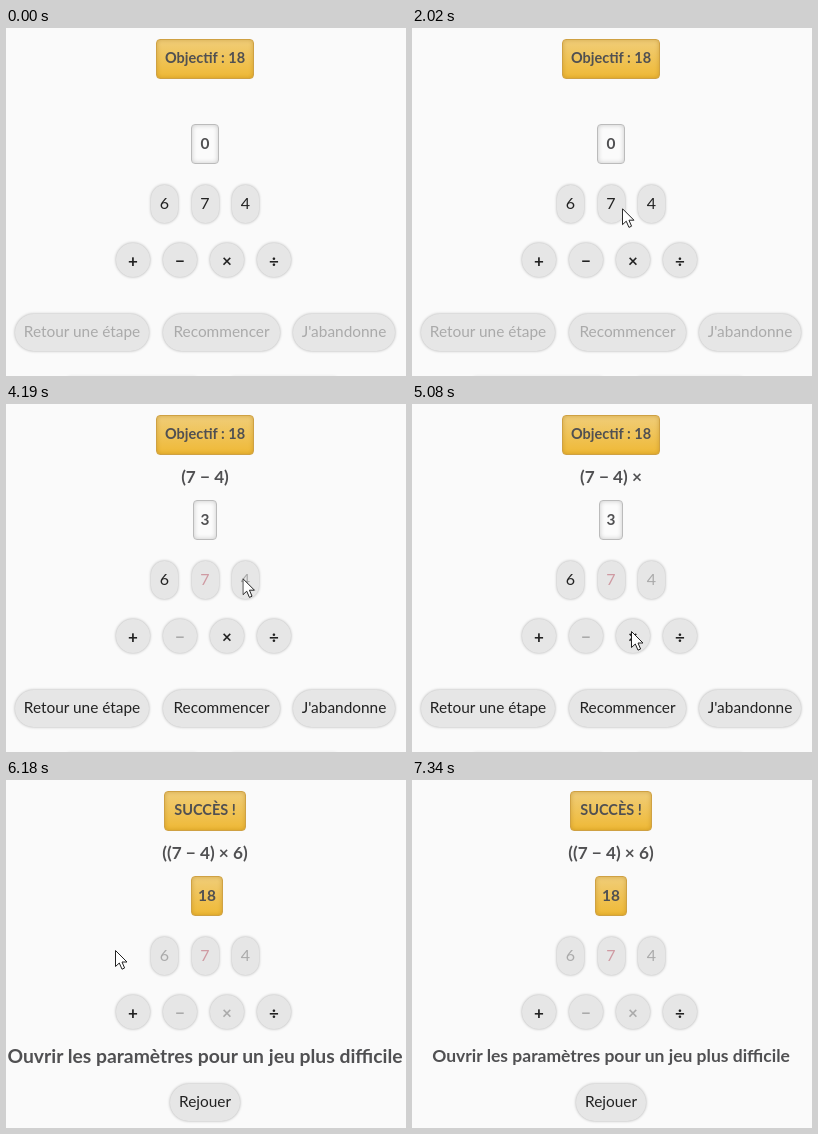
An HTML page for the animation above (8.39 s loop, 400x348 px).

```html
<!DOCTYPE html>
<html lang="fr">
<head>
<meta charset="utf-8">
<style>
html, body { margin: 0; width: 100%; height: 100%; overflow: hidden; background: #fafafa; }
#stage { position: relative; width: 400px; height: 348px; overflow: hidden; background: #fafafa;
  font: 15.4px Lato, sans-serif; color: #222; }
#stage div { position: absolute; box-sizing: border-box; padding-bottom: 3px; display: flex;
  align-items: center; justify-content: center; white-space: pre; }
#stage .btn { background: #e6e6e6; border-radius: 19px; box-shadow: 0 0 3px rgba(0,0,0,.32); }
#stage .op { padding: 0; border-radius: 50%; font-weight: bold; font-size: 17px; }
#stage .num { border-radius: 13.5px; font-size: 16px; }
#stage .off { color: #aaa; }
#stage .used { color: #cf9aa2; }
#stage .down { background: #bdbdbd; box-shadow: 0 1px 5px 1px rgba(0,0,0,.4); }
#stage .bold { font-weight: bold; color: #505052; }
#stage .box { border: 1px solid #bbb; border-radius: 4px; background: #fbfbfb;
  box-shadow: inset 0 0 5px rgba(0,0,0,.2); }
#stage .gold { border-color: #cfa143; background: linear-gradient(#f0cd78, #efb936);
  box-shadow: inset 0 0 4px rgba(150,100,0,.35); }
#stage .edge { box-shadow: 0 0 3px rgba(0,0,0,.07); }
#spot { background: #e0de4c; opacity: .88; border-radius: 50%; }
#cursor { position: absolute; left: 0; top: 0; }
</style>
</head>
<body>
<div id="stage"></div>
<script>
const LOOP = 8390, HOLD = 140, TRAVEL = 560, MID = 199, GOAL = 18;
const stage = document.getElementById('stage');

function add(cls, x, y, w, h, text = '', size = '') {
  const el = document.createElement('div');
  el.className = cls;
  el.textContent = text;
  el.style.cssText = `left:${x}px;top:${y}px;width:${w}px;height:${h}px;font-size:${size}`;
  stage.append(el);
  return el;
}

const keys = {};
function addKeys(labels, cls, x, y, w, h, step) {
  [...labels].forEach((label, i) => {
    const left = x + step * i;
    keys[label] = { el: add('btn ' + cls, left, y, w, h, label), x: left + w / 2 - 1, y: y + h / 2 - 4 };
  });
}

const target = add('box gold bold', 150, 11, 98, 40, '', '14.5px');
const formula = add('bold', 0, 60, 398, 27, '', '17.2px');
const value = add('box bold', 185, 96, 28, 40);
addKeys('674', 'num', 145, 157, 27, 38, 40.5);
addKeys('+−×÷', 'op', 110, 215, 34, 34, 47);
const tools = [
  add('btn', 9, 286, 134, 37, 'Retour une étape'),
  add('btn', 157, 286, 117, 37, 'Recommencer'),
  add('btn', 287, 286, 102, 37, "J'abandonne")
];
const edges = [add('edge', 62, 348, 128, 30), add('edge', 226, 348, 104, 30)];
const message = add('bold', 0, 261, 398, 31, 'Ouvrir les paramètres pour un jeu plus difficile', '17.5px');
const replay = add('btn', 164, 304, 70, 37, 'Rejouer');
const spot = add('', 0, 0, 24, 24);
spot.id = 'spot';
stage.insertAdjacentHTML('beforeend', `<svg id="cursor" width="14" height="21">
  <path d="M.5 .5V16.5L4.3 13L7 19.2L9.6 18L7 12H12Z" fill="#fff" stroke="#222"/></svg>`);
const cursor = document.getElementById('cursor');

const clicks = [[2170, '7'], [3175, '−'], [3920, '4'], [4600, '×'], [5760, '6']];
const entry = { time: 1470, x: 370, y: 294 };
const stops = [
  ...clicks.map(([time, key]) => ({ time, x: keys[key].x, y: keys[key].y })),
  { time: 6180, x: 110, y: 171 },
  { time: 6700, x: 94, y: 170 }
];
const compute = { '−': (a, b) => a - b, '×': (a, b) => a * b };

const clamp = p => Math.min(1, Math.max(0, p));
const ease = p => p < .5 ? 4 * p ** 3 : 1 - 4 * (1 - p) ** 3;

// Numbers count on press; operators and results follow on release.
function playGame(t) {
  const game = { text: '', total: 0, spent: new Set(), pressed: null };
  let op = '';
  for (const [start, key] of clicks) {
    if (t < start) break;
    const released = t >= start + HOLD;
    if (!released) game.pressed = key;
    if (compute[key]) {
      if (!released) continue;
      op = key;
      game.text += ' ' + key;
      continue;
    }
    game.spent.add(key);
    game.text += (op && ' ') + key;
    if (!op) game.total = +key;
    else if (released) {
      game.text = `(${game.text})`;
      game.total = compute[op](game.total, +key);
      game.spent.add(op);
      op = '';
    }
  }
  return game;
}

function cursorAt(t) {
  let { time, x, y } = entry;
  for (const stop of stops) {
    const span = Math.min(TRAVEL, stop.time - time - HOLD);
    const p = ease(clamp((t - stop.time) / span + 1));
    x += (stop.x - x) * p;
    y += (stop.y - y) * p;
    time = stop.time;
  }
  return [x, y];
}

// Ten alternating steps that swell to 4 px and die away.
function shake(p) {
  const shift = i => (-1) ** i * Math.min(4, Math.floor(2 ** (Math.min(i, 10 - i) - 1)));
  const i = Math.min(9, Math.floor(p * 10));
  return shift(i) + (shift(i + 1) - shift(i)) * ease(p * 10 - i);
}

const bounce = p => 1 - .164 * (1 - p) ** 2 * Math.cos(5 * Math.PI * p);

const show = (el, on) => { el.style.visibility = on ? 'visible' : 'hidden'; };

function setBox(el, text, width, shift) {
  el.textContent = text;
  el.style.width = width + 'px';
  el.style.left = MID - width / 2 + 'px';
  el.style.transform = `translateX(${shift}px)`;
}

const t0 = performance.now();

function draw() {
  const t = Math.max(0, performance.now() - t0) % LOOP;
  const { text, total, spent, pressed } = playGame(t);
  const won = total === GOAL;
  const intro = clamp((t - 995) / 1000), finale = clamp((t - 5980) / 1000);

  setBox(target, won ? 'SUCCÈS !' : 'Objectif : ' + GOAL, won ? 82 : 98, shake(intro));
  setBox(value, total, 16 + (total ? 8 * String(total).length : 12), shake(finale));
  value.classList.toggle('gold', won);
  formula.textContent = text;
  message.style.transform = `scale(${bounce(finale)})`;

  for (const key in keys) {
    const { classList } = keys[key].el;
    classList.toggle(key === '7' ? 'used' : 'off', spent.has(key));
    classList.toggle('down', key === pressed && key in compute);
  }
  tools.forEach(el => el.classList.toggle('off', !text));
  [...tools, ...edges].forEach(el => show(el, !won));
  show(message, finale > 0);
  show(replay, won);

  const [x, y] = cursorAt(t);
  cursor.style.transform = `translate(${x - 1}px,${y - 1}px)`;
  spot.style.transform = `translate(${x - 13}px,${y - 12}px)`;
  show(cursor, t >= stops[0].time - TRAVEL && t < 7270);
  show(spot, pressed);
  requestAnimationFrame(draw);
}
draw();
</script>
</body>
</html>
```
